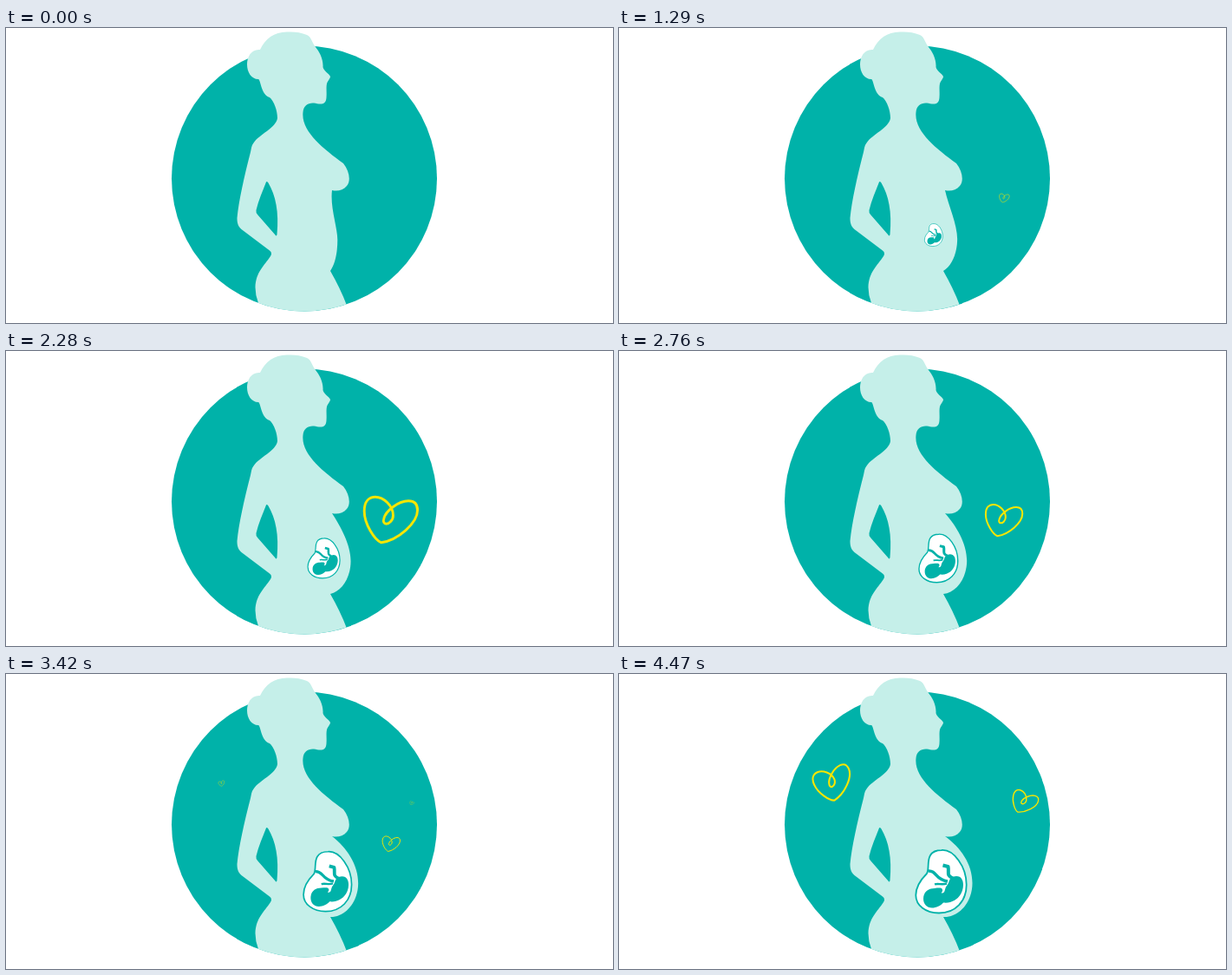
Recreate the animation shown at these times as an HTML page. Size 700 px wide and 340 px high, loop 4.5 s.

```html
<!DOCTYPE html>
<html lang="en">
<head>
<meta charset="utf-8">
<title>Pregnancy</title>
<style>
  html, body { margin: 0; width: 100%; height: 100%; overflow: hidden; background: #fff; }
  svg { display: block; width: 100%; height: 100%; }
  .teal { fill: #00b2a9; }
  .skin { fill: #c5efe9; }
  .limb { fill: none; stroke: #00b2a9; stroke-linejoin: round; }
  .heart { fill: none; stroke: #f7e600; stroke-width: 3; stroke-linejoin: round; }
</style>
</head>
<body>
<svg viewBox="0 0 700 340">
  <defs>
    <path id="heart" class="heart" d="M-12 25C-20 22 -32 3 -32 -12C-32 -24 -26 -28.7 -19 -28.7C-9 -28.7 2 -18 2 -7C2 -1 -3 3 -6 3C-9 3 -10 0 -9 -3C-7 -12 8 -24 20 -24C28 -24 30.700 -19 30.700 -13C30.700 2 8 22 -12 25Z"/>
  </defs>
  <circle class="teal" cx="344" cy="173.5" r="153"/>
  <path class="skin" id="body"/>
  <path class="teal" d="M300 177.5Q301 176 302.5 178.5C311 193 315 212 312.5 238Q312 240.5 310.5 238.5L290 215Q288 212.5 288.5 210C291 199 296 188 300 177.5Z"/>

  <g id="baby">
    <path fill="#fff" stroke="#00b2a9" stroke-width="1.8" d="M372 203C386 202 400.7 222 400.7 243C400.7 262 388 275.5 369 275.5C354 275.5 342.3 267 342.3 255C342.3 244 349 236 355 230C358 224 355 216 359 209C362 204 367 203 372 203Z"/>
    <path class="teal" d="M351 259C351 251 357 247 364 247C369 246.5 373 246 373 249C373.5 251 371 252 372 252.5C377 253 375 247 378 244C382 240 379 234 389 233C395 233 397 238 397 243C397 255 387 265 374 263.5C371 267 366 269.5 361 269.5C355 269.5 351 265 351 259Z"/>
    <path class="limb" stroke-width="4" d="M373.5 220.5L379.5 222C381 229 377 232 385 235.5"/>
    <path class="limb" stroke-width="3.5" d="M356.5 227C367 226.5 364 237 379 239"/>
    <path class="limb" stroke-width="2.4" d="M364 242.3C369 241 372 243.5 378 241.5"/>
  </g>

  <use id="mid" href="#heart"/>
  <use id="left" href="#heart"/>
  <use id="right" href="#heart"/>
</svg>
<script>
const LOOP = 4500;
const el = id => document.getElementById(id);

// Progress from 0 to 1 between two times
const span = (t, from, to) => Math.min(1, Math.max(0, (t - from) / (to - from)));

// Slow start, quick rise, soft landing
const swell = u => {
  const v = u ** 1.6;
  return v * v * (3 - 2 * v);
};
const fade = u => (1 - u) ** 1.5;

const BACK = 'M324 4.5C309 5 299 12 293 25C283 24 278 33 278 42C278 51 283 59 291 59C294 60 294 77 304 80' +
  'C309 84 313 95 313 104C311.5 115 292 122.5 285.5 132.5C283 135 283 139 282 143C274.5 172 268.500 199 266.5 219' +
  'C266.5 225 268 229 271.5 232L304 256.5Q307.5 259 305 263C298 274 288 281 287.5 299' +
  'Q287.5 308 291 317A153 153 0 0 0 392.5 318.6Q386 301 374 280';
const FRONT = 'C382 188.5 389 187 393 182C398 176 396 165 389 156C366 139 340 119 342.5 97' +
  'C343 90 348 86 355 86.5C363 88 369 89 369.5 80C370 73 369 69 370 64' +
  'C371 61 374 58 374 56C373 53 366 49 365.5 45C366 35 361 27 357 22C353 17 352 10 347 8C340 5 332 4 324 4.5Z';

function belly(k) {
  const mix = (a, b) => a + (b - a) * k;
  const x = mix(382.3, 407.5);
  return `C${mix(380, 392)} ${mix(271, 281)} ${x} ${mix(258, 263)} ${x} ${mix(244, 241)}` +
    `S${mix(373.5, 394)} ${mix(206, 200)} 376 187`;
}

function place(id, x, y, scale, turn = 0) {
  const node = el(id);
  node.style.display = scale > 0 ? '' : 'none';
  node.setAttribute('transform', `translate(${x} ${y}) rotate(${turn}) scale(${scale})`);
  return node;
}

function draw(t) {
  el('body').setAttribute('d', BACK + belly(span(t, 250, 3600)) + FRONT);

  const baby = place('baby', 358, 238.2, span(t, 0, 3600));
  baby.setAttribute('transform', baby.getAttribute('transform') + ' translate(-358 -238.2)');

  const late = swell(span(t, 2700, 4400));
  place('mid', 444.5, 196.3, swell(span(t, 600, 2150)) * fade(span(t, 2250, 4470)));
  place('left', 249, 126.2, .7 * late, -24);
  place('right', 468, 149, .47 * late, 14);
}

const start = performance.now();
function tick() {
  draw((performance.now() - start) % LOOP);
  requestAnimationFrame(tick);
}
draw(0);
requestAnimationFrame(tick);
</script>
</body>
</html>
```
